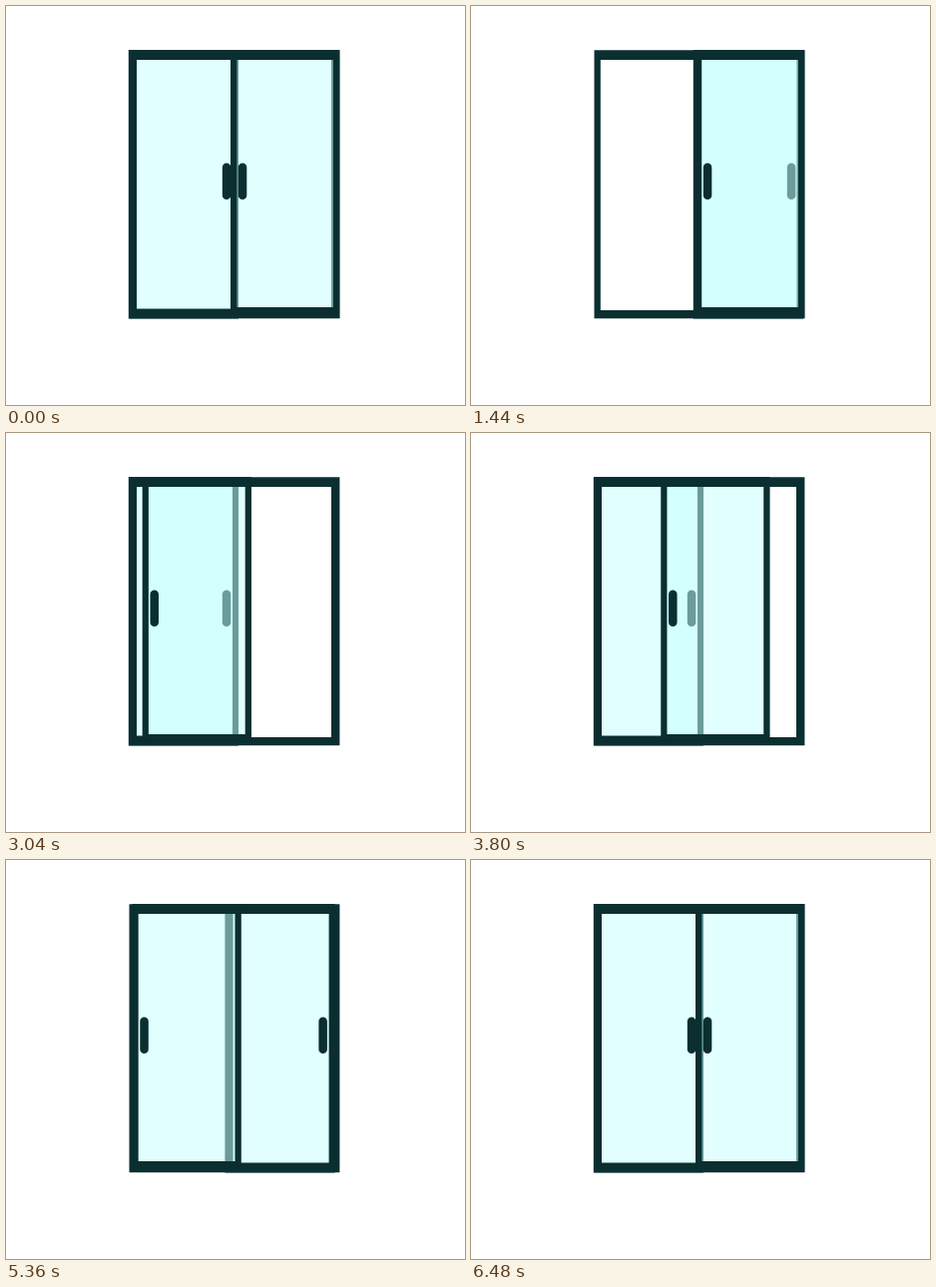
Recreate the animation shown at these times as an HTML page with a canvas. Size 460 by 400 pixels, loop 7.2 s.

```html
<!DOCTYPE html>
<html lang="en">
<head>
<meta charset="utf-8">
<title>Sliding doors</title>
<style>
  html, body { margin: 0; width: 100%; height: 100%; overflow: hidden; background: #fff; }
  canvas { display: block; }
</style>
</head>
<body>
<canvas id="stage" width="460" height="400"></canvas>
<script>
const ctx = document.getElementById('stage').getContext('2d');
const LOOP = 7200, STEP = 40, SLIDE = 960;
const DARK = '#0b2f30', GLASS = 'rgba(198,255,255,0.52)';

const frame = { x: 123.5, y: 44.3, right: 334.4, bottom: 313.2, inL: 129.8, inR: 326, inT: 54, inB: 305 };
const backDoor = { x: 122.8, y: 44, right: 233, bottom: 313.6, inL: 131, inR: 227, inT: 54, inB: 303.6, handle: 216.8, travel: 100 };
const frontDoor = { x: 225, y: 44, right: 334.3, bottom: 313, inL: 231.2, inR: 328, inT: 54, inB: 302, handle: 232.8, travel: -102 };

const easeOut = u => Math.sin(Math.min(Math.max(u, 0), 1) * Math.PI / 2);

// Opens from the start time, then closes right away.
const openness = (t, start) => easeOut((t - start) / SLIDE) - easeOut((t - start - SLIDE) / SLIDE);

function drawBorder(p) {
  ctx.fillStyle = DARK;
  ctx.beginPath();
  ctx.rect(p.x, p.y, p.right - p.x, p.bottom - p.y);
  ctx.rect(p.inL, p.inT, p.inR - p.inL, p.inB - p.inT);
  ctx.fill('evenodd');
}

function drawDoor(door, open) {
  ctx.save();
  ctx.translate(door.travel * open, 0);
  ctx.fillStyle = GLASS;
  ctx.fillRect(door.inL, door.inT, door.inR - door.inL, door.inB - door.inT);
  drawBorder(door);
  ctx.beginPath();
  ctx.roundRect(door.handle, 157.4, 8.5, 36.6, 4.25);
  ctx.fill();
  ctx.restore();
}

function draw(now) {
  const t = Math.floor((now % LOOP) / STEP) * STEP;
  ctx.clearRect(0, 0, 460, 400);
  drawBorder(frame);
  const together = openness(t, 4560);
  drawDoor(backDoor, openness(t, 480) + together);
  drawDoor(frontDoor, openness(t, 2400) + together);
}

function tick() {
  draw(performance.now());
  requestAnimationFrame(tick);
}
tick();
</script>
</body>
</html>
```
